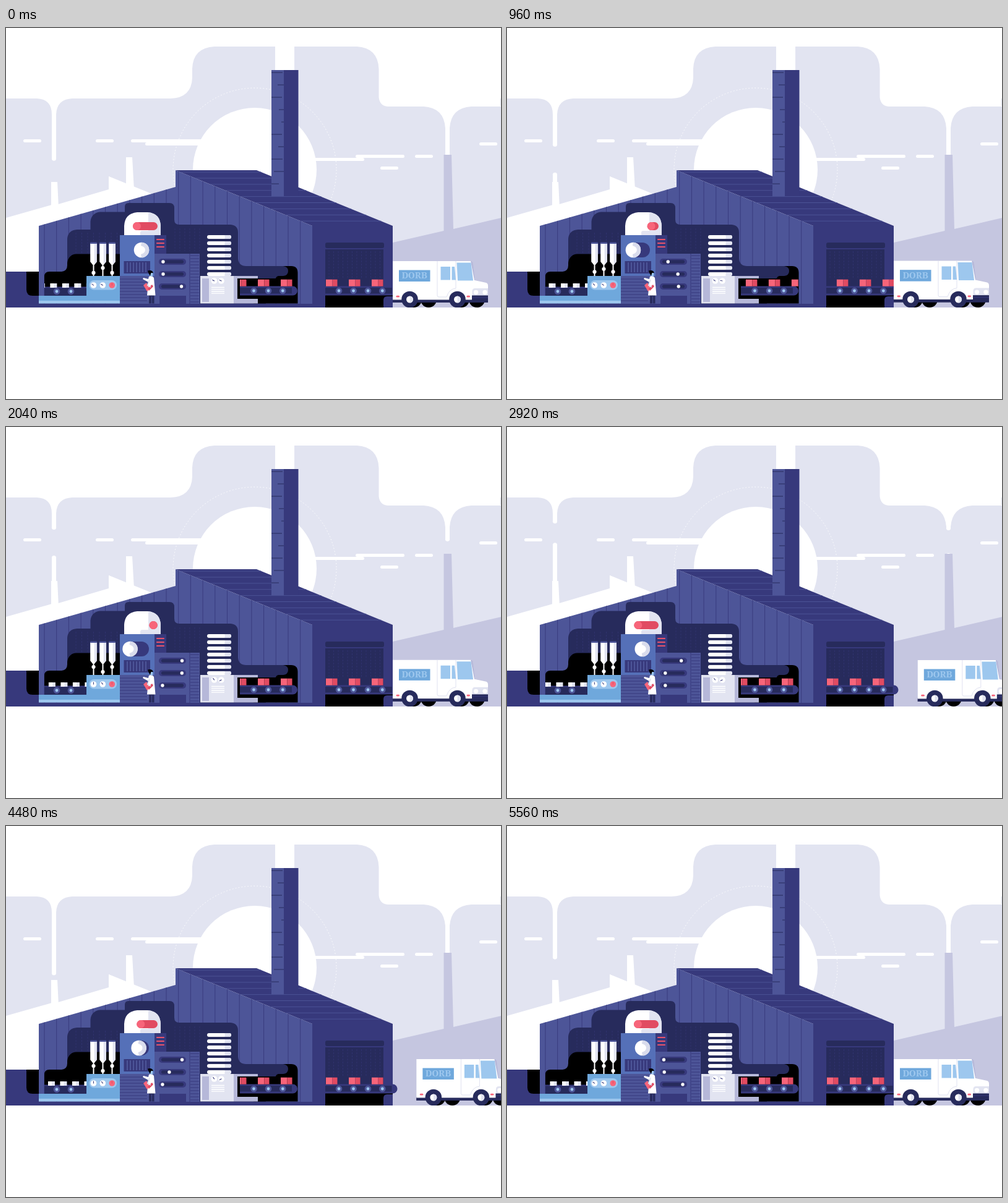
Animation of 800x600 px, one loop 5.6 s. Source, as an HTML page:

```html
<!DOCTYPE html>
<html lang="en">
<head>
<meta charset="utf-8">
<title>Factory</title>
<style>
html, body { margin: 0; width: 100%; height: 100%; overflow: hidden; background: #fff; }
svg { display: block; width: 800px; height: 600px; }
.w { fill: #fff } .sky { fill: #e2e4f1 } .hill { fill: #c5c6e0 } .lav { fill: #b6b8d9 }
.wall { fill: #4d5598 } .mid { fill: #37397c } .navy { fill: #272b5c } .k { fill: #000 }
.blue { fill: #6fa8dc } .pale { fill: #9dc7ee } .steel { fill: #5570b8 }
.red { fill: #f7657a } .crim { fill: #e14b62 }
.lw { stroke: #4d5598; fill: none } .lm { stroke: #37397c; fill: none } .ln { stroke: #272b5c; fill: none }
text { font: bold 12.2px "DejaVu Serif", "Noto Serif", serif; }
</style>
</head>
<body>
<svg viewBox="0 0 800 600">
<defs>
  <clipPath id="cutL"><rect x="62" y="400" width="68" height="34"/></clipPath>
  <clipPath id="cutM"><rect x="378" y="400" width="93" height="20"/></clipPath>
  <clipPath id="cutR"><rect x="516" y="400" width="124" height="20"/></clipPath>
  <clipPath id="land"><rect width="800" height="452"/></clipPath>
</defs>

<g id="back">
  <path class="sky" d="M0 114H50Q74 115 74 140V286L0 307Z
    M81 286V140Q82 115 107 114H266Q300 113 301 80V66Q302 32 337 30H435V240H466V30H567Q601 32 602.5 66V112Q604 126 617 127H675Q708 129 710 162V330L625 350L300 300L233 267L166 240V261Z
    M717 330V162Q719 129 752 127H800V307Z M435 68H466V250H435Z M799 114h1v12h-1Z"/>
  <g id="gapL"><rect class="sky" x="73.5" width="8"/><circle class="w" cx="77.5" r="3.6"/><circle class="w" cx="77.5" r="3.6"/></g>
  <g id="gapR"><rect class="sky" x="709.5" width="8"/><circle class="w" cx="713.5" r="3.6"/><circle class="w" cx="713.5" r="3.6"/></g>
  <path class="w" d="M73 249H83L85 290H73Z M194 209H204L207 262H194Z M166 240L233 268L166 280Z"/>
  <circle class="w" cx="402" cy="229" r="100"/>
  <circle cx="402" cy="229" r="132" fill="none" stroke="#fff" stroke-dasharray="2 3" opacity=".8"/>
  <path class="hill" d="M625 347L707.5 328V205H720L723 325L800 307V452H625Z"/>
</g>

<g id="shell">
  <path class="mid" d="M0 394H60V452H0Z"/>
  <path class="k" d="M33 394H60V433H43Q33 433 33 423Z"/>
  <path class="mid" d="M274 230H405L625 320V452H0V446H495V320Z"/>
  <path class="wall" d="M53 320L274 257V230L495 320V446H53Z"/>
  <g id="siding"></g>
  <path class="mid" d="M449 68H472.5V272H449Z"/>
  <path class="wall" d="M429 68H449V272H429Z"/>
  <path class="ln" d="M429 72h18M439 92h10M429 112h17M441 132h8M445 152h4M429 172h17M440 192h9M429 212h18M433 232h16M429 252h12"/>
</g>

<g id="room">
  <path class="navy" d="M99 390V341Q100 327 115 326H136.500V313Q138 299 152 297.500H192V289Q192 283 198 283H264Q272 283 272 291V310Q272 318 280 318H363Q375 319 375 331V373Q376 385 388 385H420V446H184V400H99Z"/>
  <path class="k" d="M62 402Q62 394 70 394H90Q99 393 99 384V380Q101 366 114 365.500H184V433H62Z"/>
  <path class="k" d="M400 385H461Q471.500 385 471.500 396V445.500H400Z"/>
  <path class="navy" d="M374 385H448Q456 386 456 393T448 401H440Q435 402 434 412H374Z"/>
  <g id="ribs"></g>

  <rect class="blue" x="53" y="433" width="131" height="8"/>
  <rect class="pale" x="53" y="441" width="131" height="4.500"/>
  <g id="beltL"></g>
  <rect class="blue" x="130" y="401" width="54" height="40"/>
  <rect class="pale" x="134.500" y="408" width="44.500" height="15.500" rx="7.700"/>
  <g id="tubes"></g>

  <path class="w" d="M191 335V320Q192 300 212 298H229Q249 300 250 320V335Z"/>
  <path class="sky" d="M230 298Q249 300 250 320V335H217V331Q217 328 220 328H230Z"/>
  <rect id="rod" class="crim" y="314" height="13" rx="6.500"/>
  <circle id="rodTip" class="red" cy="320.500" r="6.500"/>
  <rect class="steel" x="184" y="335" width="56" height="66"/>
  <rect id="slot" class="mid" y="347" height="24" rx="12"/>
  <g id="ball"><circle class="w" r="12.300"/><path fill="#d9dcec" d="M0-12.300A12.300 12.300 0 0 1 0 12.300L-1 7Q6 5 6 0T-1-7Z"/></g>
  <rect class="mid" x="190.500" y="377" width="42.500" height="20"/>
  <path d="M196 379v16m5-16v16m5-16v16m5-16v16m5-16v16m5-16v16m5-16v16" class="lw" stroke-width="2"/>
  <rect class="mid" x="240" y="335" width="19" height="30"/>
  <path d="M244 342h11M244 348h11M244 354h11" stroke="#e9536a" stroke-width="2.200" stroke-linecap="round"/>
  <path class="wall" d="M184 401H240V365H313V446H184Z"/>
  <path class="mid" d="M248 433H291V446H248Z"/>
  <g id="vents"></g>
  <g id="sliders"></g>

  <g id="person">
    <path class="navy" d="M231 430H239.500V445.500H235.800V434H235V445.500H231Z"/>
    <path class="w" d="M231 402Q236 399 239 404L241.500 432.500H228L230 411L221 406L222 404L230 406Z"/>
    <path d="M231.500 397Q234 394 237 396.500L237.500 400L235 402.500Z" fill="#9dc7ee"/>
    <path class="k" d="M229 392.500Q236 390.500 238 396L234.500 396L233 400.500Q230 397 229 392.500Z"/>
    <path class="red" d="M222 416L227 412L232 422L228 426Z"/>
    <path class="crim" d="M229 421L236 415L238 418L231 425Z"/>
    <path d="M232 407L229 416L234 419" fill="none" stroke="#e2e4f1" stroke-width="2"/>
  </g>

  <g id="plates"></g>
  <rect class="sky" x="314" y="401" width="54" height="44.500"/>
  <rect class="lav" x="317" y="405" width="11" height="38"/>
  <path d="M332 419.500h21M332 422.700h21M332 426h21M332 429.200h21" stroke="#fff" stroke-width="1.300"/>
  <rect class="lav" x="368" y="401" width="39" height="44.500"/>
  <rect class="k" x="374" y="405" width="97" height="33"/>
  <g id="dials"></g>
  <g id="beltM"></g>
</g>

<g id="dock">
  <rect class="navy" x="516" y="347" width="95" height="9" rx="3"/>
  <rect class="navy" x="516" y="358" width="94" height="62"/>
  <rect class="k" x="516" y="432" width="109" height="20"/>
  <path class="mid" d="M610 452V440Q610 434 616 434H625V452Z"/>
  <g id="slats"></g>
  <g id="beltR"></g>
</g>

<g clip-path="url(#land)">
<g id="truck">
  <g class="k"><circle cx="683" cy="439" r="13"/><circle cx="761" cy="439" r="13"/><circle cx="659" cy="439" r="13"/><circle cx="736" cy="439" r="13"/></g>
  <g id="body">
    <path class="navy" d="M625 438H779V444H625Z"/>
    <path class="w" d="M625 377H752L754 379L757.500 408L776 412Q779 413 779 417V440H625Z"/>
    <path class="lav" d="M751 377h1.500l2 2 3.500 29h-1Z"/>
    <path d="M697 377V433Q697 435 700 435H712Q716 422 727 421V377" fill="none" stroke="#dfe1f0"/>
    <path class="pale" d="M702.500 386H718V407.500H702.500Z M720.500 386H725L727 407.500H720.500Z M728.500 379.500H751.500L755 408.500H730Z"/>
    <path class="sky" d="M753.500 433V425Q754 421 758 421H779V433Z"/>
    <circle class="w" cx="759.500" cy="427.500" r="3.700"/><circle class="w" cx="774" cy="427.500" r="3.700"/>
    <path class="navy" d="M753 432.500H779V440H753Z"/>
    <path class="lm" d="M754 436h25"/>
    <rect class="blue" x="635" y="391.500" width="50.500" height="18.500"/>
    <text class="pale" x="660.300" y="405.200" text-anchor="middle">DORB</text>
    <rect class="red" x="630.500" y="432.800" width="5.500" height="2.800" rx="1.400"/>
    <rect class="red" x="744.500" y="432.800" width="5.500" height="2.800" rx="1.400"/>
    <path class="navy" d="M625 439.500H779V444H625Z"/>
  </g>
  <g class="navy"><circle cx="652.500" cy="439" r="13.300"/><circle cx="729.500" cy="439" r="13.300"/></g>
  <g class="w"><circle cx="652.500" cy="439" r="5.500"/><circle cx="729.500" cy="439" r="5.500"/></g>
  <path class="sky" d="M652.500 433.500a5.500 5.500 0 0 1 0 11ZM729.500 433.500a5.500 5.500 0 0 1 0 11Z"/>
</g>
</g>
</svg>

<script>
const LOOP = 5600, CYCLE = 1400;
const $ = id => document.getElementById(id);
const add = (id, markup) => $(id).insertAdjacentHTML('beforeend', markup);
const repeat = (n, fn) => Array.from({ length: n }, (_, i) => fn(i)).join('');
const rect = (cls, x, y, w, h, r = 0) =>
  `<rect class="${cls}" x="${x}" y="${y}" width="${w}" height="${h}" rx="${r}"/>`;
const circle = (cls, x, y, r) => `<circle class="${cls}" cx="${x}" cy="${y}" r="${r}"/>`;
const line = (cls, x1, y1, x2, y2, extra = '') =>
  `<path class="${cls}" d="M${x1} ${y1}L${x2} ${y2}" ${extra}/>`;
const set = (el, attrs) => { for (const k in attrs) el.setAttribute(k, attrs[k]); };
const move = (el, x, y) => el.setAttribute('transform', `translate(${x} ${y})`);

// Static repeats
[[28, 180, 29], [145, 180, 29], [202, 180, 120], [225, 185, 95], [495, 210, 84],
 [565, 205, 79], [661, 205, 29], [605, 224, 29], [765, 185, 29]]
  .forEach(([x, y, w]) => add('back', rect('w', x, y, w, 5, 2.5)));

add('siding', repeat(22, i => {
  const x = 62 + i * 19.7;
  const top = x < 274 ? 320 - (x - 53) * 0.285 : 230 + (x - 274) * 0.407;
  return line('lm', x, top, x, 446, 'stroke-width=".9"');
}));
add('siding', repeat(9, i => {
  const y = 233 + i * 9.9, d = (y - 230) * 2.45;
  return line('lw', 274 + d, y, 405 + d, y, 'stroke-width=".9"');
}));
const dash = 'stroke-width=".8" stroke-dasharray="3 2" opacity=".7"';
add('ribs', repeat(8, i => line('lm', 113 + i * 9.5, 331, 113 + i * 9.5, 365, dash)));
add('ribs', repeat(6, i => line('lm', 273 + i * 8, 324, 273 + i * 8, 361, dash)));
add('slats', repeat(12, i => line('lm', 522 + i * 7.5, 361, 522 + i * 7.5, 405, dash)));
add('vents', repeat(8, i => line('lm', 184, 406 + i * 5, 228, 406 + i * 5)));
add('vents', repeat(16, i => line('lm', 298, 368 + i * 5, 312, 368 + i * 5)));
add('vents', line('lm', 297, 365, 297, 446));
add('plates', repeat(7, i => rect('w', 325, 335 + i * 10, 39, 6, 3) +
  `<path class="sky" d="M353.500 ${335 + i * 10}h7.500a3 3 0 0 1 0 6h-7.500Z"/>`));

// Moving parts
add('tubes', [141.5, 156.5, 171.5].map(x =>
  `<path class="w" d="M${x - 5.3} 348h10.600v30l-4 5h-2.600l-4-5Z"/>` +
  `<path class="sky" d="M${x + 1} 348h4.300v30l-4 5Z"/>` +
  rect('wall', x - 5.3, 346.5, 10.6, 2.5) + rect('w', x - 1, 382, 2, 19) +
  `<circle class="w ball" cx="${x}" r="3.100"/>`).join(''));
add('sliders', [378, 398, 418].map(y =>
  rect('mid', 247, y - 5, 44, 10, 5) + rect('navy', 251, y - 2.7, 36, 5.4, 2.7) +
  `<circle class="w knob" cy="${y}" r="2.700"/>`).join(''));
add('dials', [[141.5, 416, 'w'], [156.3, 416, 'w'], [171.3, 416, 'red'], [336.5, 409, 'w'], [348, 409, 'w']]
  .map(([x, y, c]) => circle(c, x, y, 4.8) +
    `<g transform="translate(${x} ${y})"><path class="needle ${c === 'red' ? '' : 'lm'}" d="M0 .5V-3.500" stroke="${c === 'red' ? '#e14b62' : ''}"/></g>`).join(''));

const wheels = (xs, y) => xs.map(x => circle('wall', x, y, 5.3) + circle('pale', x, y, 2.4)).join('');
const crate = x => rect('red', x, 406.700, 10.500, 11) + rect('crim', x + 10.5, 406.700, 8, 11);
const belt = (x, end, xs) =>
  `<path class="mid" d="M${x} 417.500H${end - 7.5}a7.500 7.500 0 0 1 0 15H${x}Z"/>` +
  rect('navy', x, 420, end - x - 9, 9.500) + wheels(xs, 425);
add('beltM', belt(378, 471, [400.5, 424, 447.3]) +
  `<g clip-path="url(#cutM)"><g id="cratesM">${[333, 370, 407, 444].map(crate).join('')}</g></g>`);
add('beltR', belt(516, 632.5, [538, 561.5, 585, 608.3]) +
  `<g clip-path="url(#cutR)"><g id="cratesR">${[480, 517, 554, 591].map(crate).join('')}</g></g>`);
add('beltL', rect('navy', 62, 419, 68, 14) + rect('mid', 62, 418.5, 68, 2) + wheels([82, 105], 426) +
  `<g clip-path="url(#cutL)"><g id="cartons">${repeat(6, i =>
    rect('w', 48.7 + i * 19.5, 413, 7, 7) + rect('sky', 54.7 + i * 19.5, 413, 5, 7))}</g></g>`);

const clamp = p => Math.max(0, Math.min(1, p));
const inOut = (p, n) => p < 0.5 ? (2 * p) ** n / 2 : 1 - (2 - 2 * p) ** n / 2;
const sine = p => (1 - Math.cos(Math.PI * clamp(p))) / 2;
const swing = (t, n) => {
  const u = t % CYCLE;
  return inOut((u < 700 ? u : CYCLE - u) / 700, n);
};
const snap = t => {
  const u = t % CYCLE;
  return u < 700 ? 1 - (1 - clamp(u / 220)) ** 3 : 1 - inOut(clamp((u - 700) / 420), 3);
};

// A break in a smoke column drifting up; the cloud keeps a short stub
function drawGap(el, top, size, stub) {
  const [box, upper, lower] = el.children;
  const bottom = top + size;
  el.style.display = bottom > stub ? '' : 'none';
  top = Math.max(top, stub);
  set(box, { y: top - 3.6, height: Math.max(0, bottom - top + 7.2) });
  upper.setAttribute('cy', top - 3.6);
  lower.setAttribute('cy', bottom + 3.6);
}

const balls = document.querySelectorAll('.ball');
const knobs = document.querySelectorAll('.knob');
const needles = document.querySelectorAll('.needle');

function truckX(t) {
  if (t < 4000) return 200 * clamp((t - 2400) / 900) ** 3;
  return 200 * (1 - clamp((t - 4100) / 900)) ** 3;
}

function draw(t) {
  const rise = t * 133.3 / LOOP;
  drawGap($('gapL'), (t > 4300 ? 348 : 214.7) - rise, 42, 156);
  drawGap($('gapR'), 233.5 - rise, 40, 167);

  const slide = swing(t, 3.4), quick = snap(t);
  const rodX = 205 + 26.5 * slide;
  set($('rod'), { x: rodX, width: 245 - rodX });
  $('rodTip').setAttribute('cx', rodX + 6.5);
  const ballX = 219 - 18.5 * slide;
  set($('slot'), { x: ballX - 12, width: 243 - ballX });
  move($('ball'), ballX, 359);

  balls.forEach((b, i) => b.setAttribute('cy', i === 1 ? 388 + 8 * quick : 396 - 8 * quick));
  [253.5 + 31 * quick, 254 + 30.7 * swing(t, 2), 284 - 31 * quick]
    .forEach((x, i) => knobs[i].setAttribute('cx', x));
  needles.forEach((n, i) => {
    const angle = i % 2 ? -60 + 25 * quick : -55 + 55 * quick;
    n.setAttribute('transform', `rotate(${i === 2 ? 0 : i === 4 ? -angle - 120 : angle})`);
  });

  move($('cartons'), 19.5 * sine(((t + 110) % 700) / 420), 0);
  // Loading pauses while the truck is away
  const start = [770, 2170, 4970].find(s => t >= s && t < s + 420);
  const shift = start ? 37 * sine((t - start) / 420) : 0;
  move($('cratesM'), shift, 0);
  move($('cratesR'), shift, 0);

  move($('truck'), truckX(t), 0);
  move($('body'), 0, t < 2400 ? -0.4 * Math.abs(Math.sin(t * Math.PI / 400)) : 0);
}

const begin = performance.now();
function tick() {
  draw((performance.now() - begin) % LOOP);
  requestAnimationFrame(tick);
}
draw(0);
requestAnimationFrame(tick);
</script>
</body>
</html>
```
